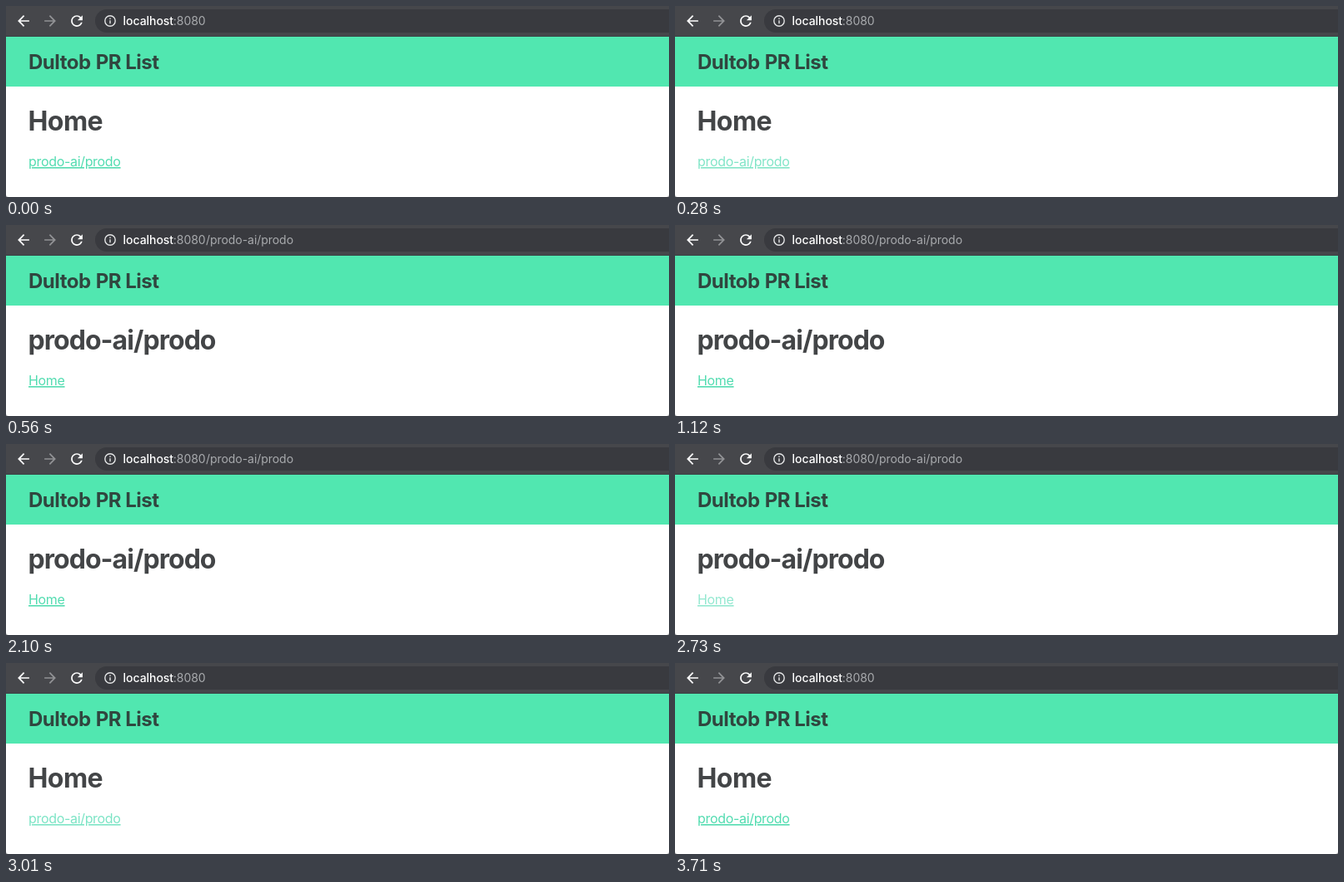
Recreate the animation shown at these times as an HTML page. Size 796x230 px, loop 3.78 s.

```html
<!DOCTYPE html>
<html lang="en">
<head>
<meta charset="utf-8">
<title>PR List</title>
<style>
  html, body { margin: 0; width: 100%; height: 100%; overflow: hidden; background: #fff; }
  svg { display: block; width: 100%; height: 100%; }
  text { font-family: Inter, "Open Sans", sans-serif; font-optical-sizing: none; }
  .brand { font-size: 24px; font-weight: 700; letter-spacing: -.5px; fill: #30463f; }
  .heading { font-size: 32px; font-weight: 700; fill: #434547; }
  .link { font-size: 16px; letter-spacing: -.32px; text-decoration: underline; }
  .url { font-size: 14px; letter-spacing: -.05px; fill: #a9abae; }
  .host { font-weight: 500; fill: #fff; }
</style>
</head>
<body>
<svg viewBox="0 0 796 230" xmlns="http://www.w3.org/2000/svg">
  <rect width="796" height="230" fill="#fff"/>

  <!-- browser toolbar -->
  <rect width="796" height="37" fill="#46474b"/>
  <rect x="107" y="4" width="720" height="28" rx="14" fill="#393a3f"/>
  <rect y="36" width="796" height="1" fill="#3a4345"/>
  <defs>
    <path id="arrow" d="M8 -1H-4.17L1.42 -6.59 0 -8-8 0 0 8 1.41 6.59-4.17 1H8z"/>
  </defs>
  <use href="#arrow" transform="translate(21 18) scale(.86)" fill="#fff"/>
  <use href="#arrow" transform="translate(53 18) scale(-.86 .86)" fill="#919295"/>
  <path transform="translate(74.7 7.7) scale(.86)" fill="#fff"
    d="M17.65 6.35C16.2 4.9 14.21 4 12 4c-4.42 0-7.99 3.58-7.99 8s3.57 8 7.99 8c3.73 0 6.84-2.55 7.73-6h-2.08c-.82 2.33-3.04 4-5.65 4-3.31 0-6-2.69-6-6s2.69-6 6-6c1.66 0 3.14.69 4.22 1.78L13 11h7V4z"/>
  <g fill="none" stroke="#e4e5e6" stroke-width="1.4">
    <circle cx="125" cy="18" r="6.2"/>
    <path d="M125 17.2v4M125 14.4v1.5"/>
  </g>
  <text class="url host" x="140.6" y="23">localhost</text>
  <text class="url" x="200.8" y="23">:8080</text>
  <text class="url" id="path" x="240" y="23"></text>

  <!-- page -->
  <rect y="37" width="796" height="60" fill="#51e7b0"/>
  <text class="brand" x="27" y="76">Dultob<tspan x="107.7">PR List</tspan></text>
  <text class="heading" id="heading" x="26.5" y="149.5"></text>
  <text class="link" id="link" x="27" y="193"></text>

  <path d="M0 227Q0 230 3 230H0zM796 227Q796 230 793 230H796z" fill="#8b8c8e"/>
</svg>
<script>
  const LOOP = 3780, STEP = 70;
  const OPEN = 560, BACK = 2800;
  const REPO = 'prodo-ai/prodo';
  const LINK = [82, 220, 176], HOVER = [147, 232, 208];
  const [path, heading, link] = ['path', 'heading', 'link'].map(id => document.getElementById(id));

  // smooth 0..1 ramp between two times
  function ramp(t, from, to) {
    const p = Math.min(1, Math.max(0, (t - from) / (to - from)));
    return p * p * (3 - 2 * p);
  }

  function hoverAt(t) {
    if (t < OPEN) return ramp(t, 20, 420);
    if (t < BACK) return ramp(t, 2330, 2730);
    return 1 - ramp(t, 2870, 3220);
  }

  let shown = null;
  function showPage(inRepo) {
    if (inRepo === shown) return;
    shown = inRepo;
    path.textContent = inRepo ? '/' + REPO : '';
    heading.textContent = inRepo ? REPO : 'Home';
    heading.style.letterSpacing = inRepo ? '-.95px' : '-.55px';
    link.textContent = inRepo ? 'Home' : REPO;
  }

  function draw(t) {
    showPage(t >= OPEN && t < BACK);
    const h = hoverAt(t);
    const rgb = LINK.map((c, i) => Math.round(c + (HOVER[i] - c) * h));
    link.setAttribute('fill', `rgb(${rgb})`);
  }

  const start = performance.now();
  function tick() {
    const t = (performance.now() - start) % LOOP;
    draw(Math.floor(t / STEP) * STEP);
    requestAnimationFrame(tick);
  }
  draw(0);
  requestAnimationFrame(tick);
</script>
</body>
</html>
```
